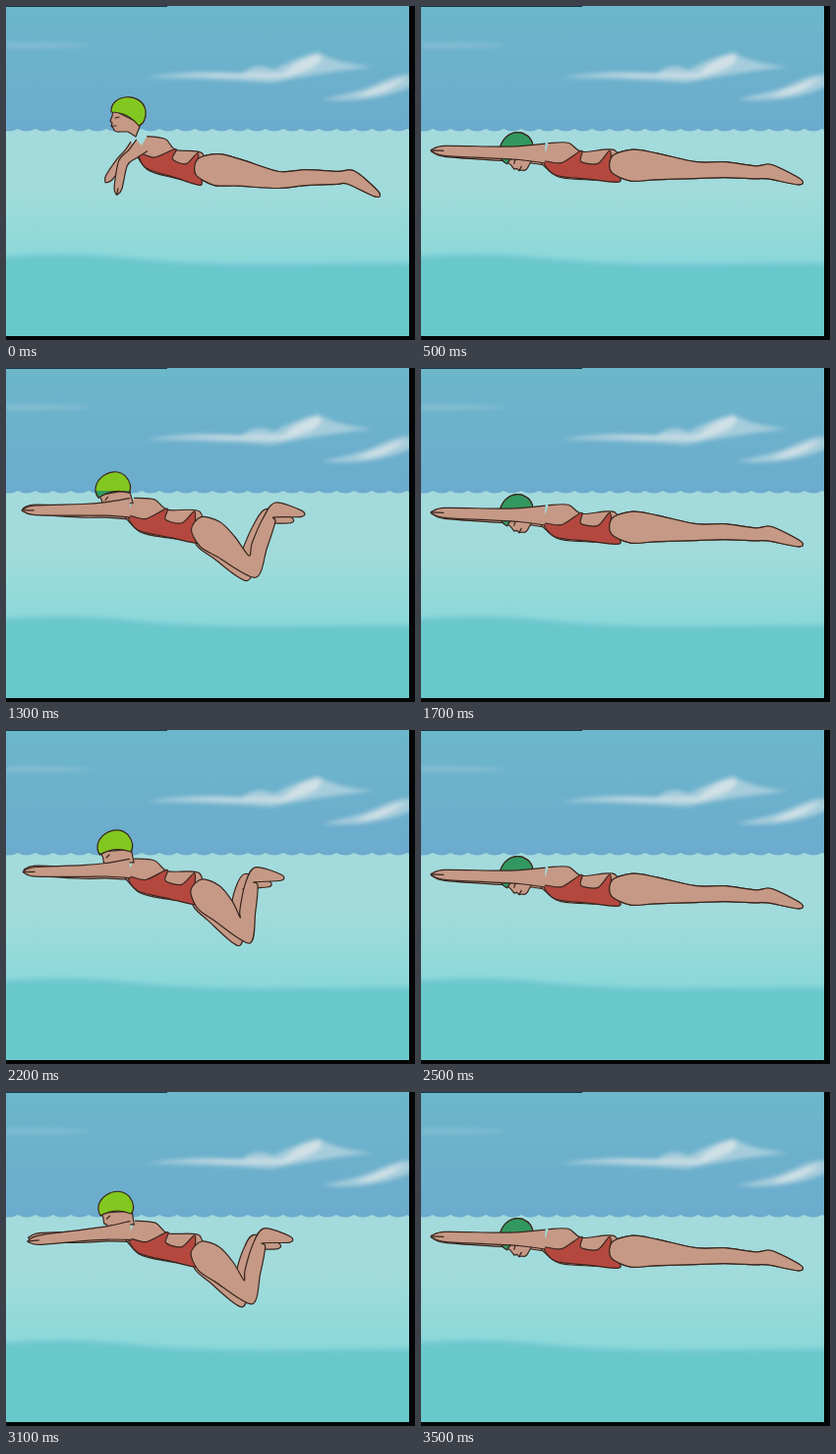
Write an HTML page that moves like this. It is 416 by 340 pixels and loops after 3.6 s.

```html
<!DOCTYPE html>
<html lang="en">
<head>
<meta charset="utf-8">
<title>Breaststroke</title>
<style>
  html, body { margin: 0; width: 100%; height: 100%; overflow: hidden; background: #050607; }
  svg { display: block; width: 416px; height: 340px; }
  .ink { stroke: #38261f; stroke-width: 1.2; stroke-linejoin: round; stroke-linecap: round; }
  .skin { fill: #c59985; }
  .suit { fill: #b4483f; }
  .line { fill: none; }
</style>
</head>
<body>
<svg viewBox="0 0 416 340">
  <defs>
    <linearGradient id="sky" x2="0" y2="1">
      <stop offset="0" stop-color="#6cb7ca"/>
      <stop offset="1" stop-color="#6caace"/>
    </linearGradient>
    <linearGradient id="water" x2="0" y2="1">
      <stop offset="0" stop-color="#a4dadc"/>
      <stop offset=".3" stop-color="#a1dbdb"/>
      <stop offset=".62" stop-color="#8bd8d9"/>
    </linearGradient>
    <filter id="soft" x="-10%" y="-40%" width="120%" height="180%"><feGaussianBlur stdDeviation="2"/></filter>
    <clipPath id="view"><rect width="410" height="336"/></clipPath>
    <clipPath id="under"><rect y="125" width="416" height="215"/></clipPath>
  </defs>
  <g clip-path="url(#view)">
    <rect width="416" height="140" fill="url(#sky)"/>
    <g filter="url(#soft)" fill="#a6ccdb">
      <path d="M142,73 Q190,64 240,69 Q254,56 272,65 Q296,52 318,47 Q334,58 374,62 Q330,66 270,78 Q200,73 142,73Z"/>
      <path d="M320,95 Q360,88 380,78 T416,70 V80 Q376,100 320,95Z"/>
      <path d="M0,37 Q50,36 92,40 Q50,44 0,43Z" opacity=".4"/>
      <path fill="#d0e1e6" d="M180,70 Q230,68 282,69 Q298,53 318,49 Q330,60 282,73 Q230,72 180,70Z M356,92 Q382,80 406,73 Q386,92 356,92Z"/>
    </g>
    <path id="sea" fill="url(#water)"/>
    <path d="M-9,257 Q60,251 125,258 T280,264 T420,263 V350 H-9Z" fill="#68c8ca" stroke="#75c9d3" stroke-width="4" filter="url(#soft)"/>
    <path d="M0,.5 H164" stroke="#17384a"/>
    <g class="ink">
      <path id="farLeg" class="skin"/>
      <path id="farArm" class="skin"/>
      <path id="torso" class="skin"/>
      <path id="suit" class="suit"/>
      <path id="leg" class="skin"/>
      <g id="head">
        <path class="skin" d="M-15,-2 L-16,4 L-18,9 L-16,11 L-17,14 L-15,16 Q-14,21 -8,20 L0,20 L8,25 L13,12Z"/>
        <path class="line" d="M-13,6 L-9,5 M-16,14 L-12,14"/>
        <path id="cap" fill="#82c71f" d="M-17,0 C-18,-19 14,-21 18,-2 C19,6 16,12 11,14 C4,5 -6,0 -17,0Z"/>
      </g>
      <g clip-path="url(#under)"><use id="wetCap" href="#cap"/></g>
      <path id="arm" class="skin"/>
      <path id="fingers" class="line"/>
    </g>
  </g>
</svg>
<script>
const LOOP = 3600, STEP = 100, STROKE = 950;

// Joints in pixels, bone directions in degrees; the last arm and leg value is foreshortening.
const poses = {
  recover: { head: [124, 108, 0], shoulder: [138, 142], hip: [198, 164], arm: [137, 101, .5], leg: [9, -2, 30, 1] },
  bent: { head: [110, 118, -32], shoulder: [126, 141], hip: [196, 160], arm: [177, 179, .92], leg: [45, -85, 3, .86] },
  glide: { head: [96, 146, -60], shoulder: [126, 150], hip: [198, 161], arm: [181, 182, .98], leg: [4, 2, 16, 1.02] },
  pull: { head: [116, 111, 0], shoulder: [129, 141], hip: [198, 164], arm: [146, 132, .66], leg: [9, -2, 33, 1.02] }
};
const timeline = [
  [0, 'recover'], [300, 'bent'], [500, 'glide'], [750, 'glide'], [900, 'pull'], [950, 'recover']
];

// Half widths along a chain: [position in bones, back side, front side].
const armShape = [[0, 10, 10], [.5, 7, 7], [1, 6, 6], [1.8, 5, 5], [2, 1, 1]];
const legShape = [[-.05, 8, 8], [.2, 16, 16], [.5, 14, 13], [1, 8, 9], [1.4, 9, 7], [1.85, 6, 7], [2.1, 9, 6], [3, 3, 3]];
const torsoShape = [[0, 11, 11], [.5, 18, 18], [1, 14, 14], [2, 14, 14]];
// Around the suit in torso terms: position along the spine, then 1 for back to -1 for belly.
const suitShape = [[.9, 1], [1, .3], [1.5, .1], [1.85, 1], [1.9, -.1], [2.1, -1], [1.2, -1], [.45, -1], [.05, -.7], [.5, -.2]];

const el = id => document.getElementById(id);
const mix = (a, b, k) => a.map((v, i) => v + (b[i] - v) * k);
const clamp = (v, lo, hi) => Math.min(hi, Math.max(lo, v));

function poseAt(phase) {
  const next = timeline.findIndex(([time]) => time > phase);
  const [t0, from] = timeline[next - 1], [t1, to] = timeline[next];
  const k = (1 - Math.cos(Math.PI * (phase - t0) / (t1 - t0))) / 2;
  return Object.fromEntries(Object.keys(poses[from]).map(part => [part, mix(poses[from][part], poses[to][part], k)]));
}

// Joint positions from a root, bone lengths and directions.
function chain(root, lengths, angles, scale) {
  const joints = [root];
  lengths.forEach((length, i) => {
    const [x, y] = joints[i], a = angles[i] * Math.PI / 180;
    joints.push([x + length * scale * Math.cos(a), y + length * scale * Math.sin(a)]);
  });
  return joints;
}

function normal([ax, ay], [bx, by]) {
  const length = Math.hypot(bx - ax, by - ay);
  return [(by - ay) / length, (ax - bx) / length];
}

function widthAt(shape, u, side) {
  const i = clamp(shape.findIndex(([at]) => at >= u), 1, shape.length - 1);
  const [a, b] = [shape[i - 1], shape[i]], k = clamp((u - a[0]) / (b[0] - a[0]), 0, 1);
  return mix(a, b, k)[side > 0 ? 1 : 2];
}

// Point beside a chain; the inside of a bent joint is mitred.
function beside(joints, shape, u, v, thickness = 1) {
  const i = clamp(Math.floor(u), 0, joints.length - 2);
  const centre = mix(joints[i], joints[i + 1], u - i);
  let n = normal(joints[i], joints[i + 1]);
  if (u === i && i > 0) {
    const before = normal(joints[i - 1], joints[i]);
    const inner = (before[0] * n[1] - before[1] * n[0]) * v < 0;
    n = mix(before, n, .5);
    const size = Math.hypot(...n);
    n = n.map(c => c / (inner ? size * size : size));
  }
  const r = widthAt(shape, u, v) * v * thickness;
  return centre.map((c, j) => c + n[j] * r);
}

function curve(points, open) {
  const n = points.length;
  const at = i => points[open ? clamp(i, 0, n - 1) : (i + n) % n];
  const handle = (i, sign) => at(i).map((c, j) => c + sign * .15 * (at(i + 1)[j] - at(i - 1)[j]));
  let d = 'M' + points[0];
  for (let i = 0; i < n - (open ? 1 : 0); i++) d += `C${handle(i, 1)} ${handle(i + 1, -1)} ${at(i + 1)}`;
  return d;
}

function drawLimb(id, joints, shape, open, thickness) {
  const side = v => shape.map(([u]) => beside(joints, shape, u, v, thickness));
  el(id).setAttribute('d', curve([...side(1), ...side(-1).reverse()], open));
}

function drawArm(id, [x, y], [upper, fore, scale]) {
  const joints = chain([x, y], [52, 65], [upper, fore], scale);
  drawLimb(id, joints, armShape, true, .6 + .4 * scale);
  return joints;
}

function drawLeg(id, root, [thigh, shin, foot, scale]) {
  drawLimb(id, chain(root, [80, 70, 35], [thigh, shin, foot], scale), legShape);
}

function draw(ms) {
  const time = Math.floor((ms % LOOP) / STEP) * STEP;
  const { head, shoulder, hip, arm, leg } = poseAt(time % STROKE);

  // The far limbs follow the near ones, spreading apart as they fold.
  const fold = 1 - arm[2], bend = clamp((leg[0] - 9) / 36, 0, 1);
  drawArm('farArm', [shoulder[0] - 12 * fold, shoulder[1] + 2], [arm[0], arm[1] + 50 * fold, arm[2] - .2 * fold]);
  drawLeg('farLeg', hip, [leg[0] + 8 * bend, leg[1], leg[2], leg[3] - .06 * bend]);

  const [midX, midY] = mix(shoulder, hip, .5);
  const spine = [shoulder, [midX, midY + 7], hip];
  drawLimb('torso', spine, torsoShape, true);
  el('suit').setAttribute('d', curve(suitShape.map(([u, v]) => beside(spine, torsoShape, u, v))));
  drawLeg('leg', hip, leg);

  const place = `translate(${head[0]} ${head[1]}) rotate(${head[2]})`;
  el('head').setAttribute('transform', place);
  el('wetCap').setAttribute('transform', place);

  const [, elbow, tip] = drawArm('arm', shoulder, arm);
  el('fingers').setAttribute('d', `M${mix(elbow, tip, .82)}L${tip}`);
}

// The submerged part of the cap is the same shape in a darker green.
const wet = el('cap').cloneNode();
wet.id = 'wetCap';
wet.setAttribute('fill', '#32985f');
el('wetCap').replaceWith(wet);

el('sea').setAttribute('d', 'M-6,125' + 'q9,5 18,0'.repeat(24) + 'V340H-6Z');

const start = performance.now();
function tick() {
  draw(performance.now() - start);
  requestAnimationFrame(tick);
}
tick();
</script>
</body>
</html>
```
